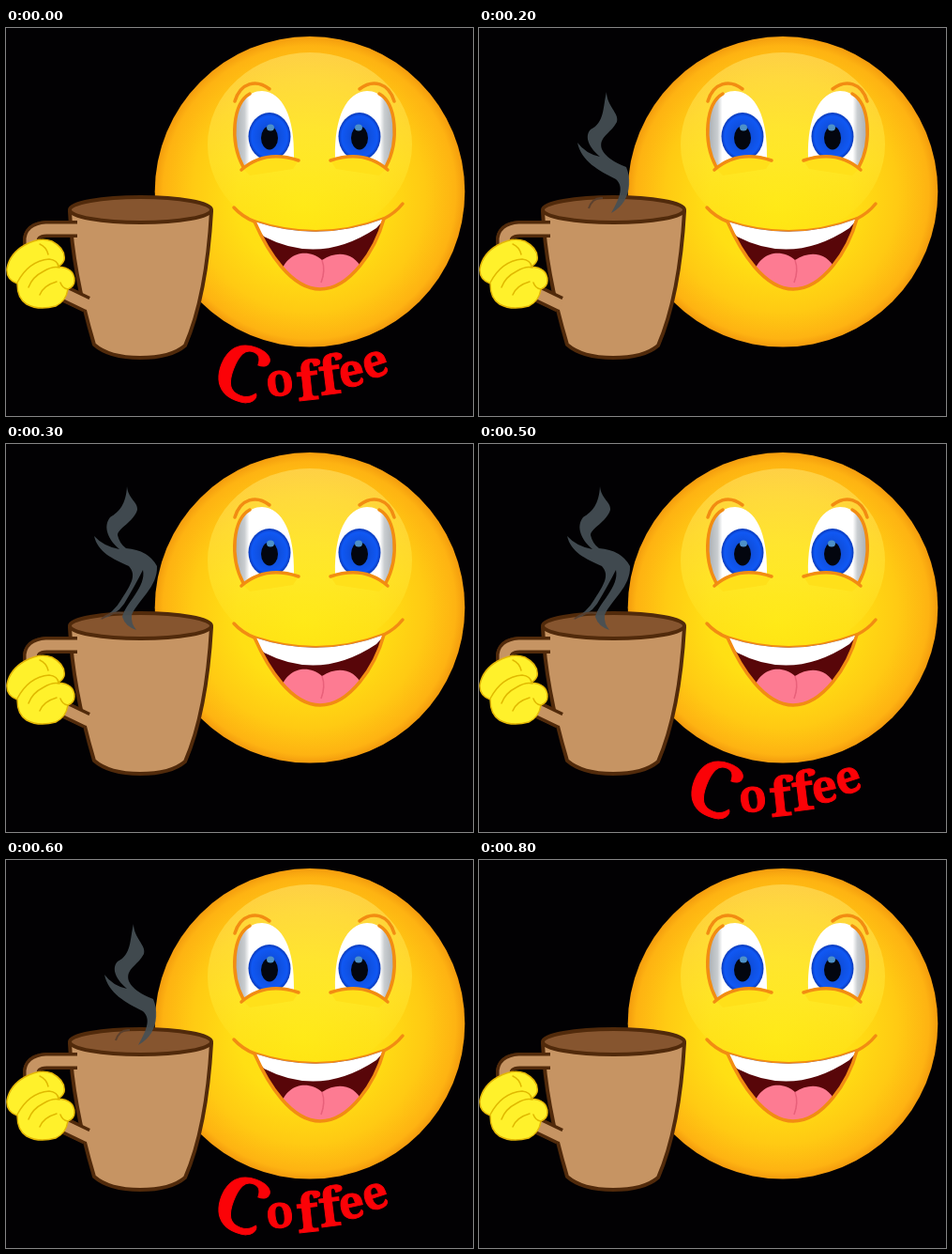
These frames come from a looping animation (498x413 px, 0.9 s). An HTML page:

```html
<!DOCTYPE html>
<html lang="en">
<head>
<meta charset="utf-8">
<title>Coffee</title>
<style>
  html, body { margin: 0; width: 100%; height: 100%; overflow: hidden; background: #020103; }
  svg { display: block; width: 100%; height: 100%; }
  .steam { fill: #465056; opacity: 0; }
  .word { fill: #fb0207; stroke: #fb0207; stroke-width: 1; font: 900 48px "Noto Serif", "DejaVu Serif", serif; opacity: 0; }
  .line { fill: none; stroke: #f28c12; stroke-width: 3.5; stroke-linecap: round; }
  .mug { stroke: #512a0b; stroke-width: 4; stroke-linejoin: round; }
  .fold { fill: none; stroke: #e0b900; stroke-width: 1.5; stroke-linecap: round; }
</style>
</head>
<body>
<svg viewBox="0 0 498 413" preserveAspectRatio="none">
  <defs>
    <radialGradient id="skin" gradientUnits="userSpaceOnUse" cx="324" cy="174" r="166" fx="318" fy="188">
      <stop offset="0" stop-color="#ffe812"/>
      <stop offset=".45" stop-color="#ffdf14"/>
      <stop offset=".75" stop-color="#ffca13"/>
      <stop offset=".94" stop-color="#feb312"/>
      <stop offset="1" stop-color="#f39a0d"/>
    </radialGradient>
    <linearGradient id="shine" x2="0" y2="1">
      <stop offset="0" stop-color="#ffe878" stop-opacity=".5"/>
      <stop offset=".6" stop-color="#fff040" stop-opacity=".4"/>
      <stop offset="1" stop-color="#fff030" stop-opacity="0"/>
    </linearGradient>
    <radialGradient id="iris">
      <stop offset="0" stop-color="#0a3fb4"/>
      <stop offset=".5" stop-color="#0f50e0"/>
      <stop offset=".85" stop-color="#1058f4"/>
      <stop offset="1" stop-color="#0838b8"/>
    </radialGradient>
    <linearGradient id="eye">
      <stop offset="0" stop-color="#a9aeb3"/>
      <stop offset=".16" stop-color="#c9cdd0"/>
      <stop offset=".24" stop-color="#fff"/>
    </linearGradient>
    <clipPath id="mouth"><path d="M265 206Q335 229 403 203C394 236 367 278 335 278C304 278 279 238 265 206Z"/></clipPath>
    <g id="eyeball">
      <path d="M253 148C237 117 243 67 273 67C295 68 308 95 307 138Q276 130 253 148Z" fill="url(#eye)"/>
      <path class="line" d="M253 148C238 120 242 80 260 70"/>
      <ellipse cx="281" cy="115.500" rx="22.500" ry="25.500" fill="url(#iris)"/>
      <ellipse cx="281" cy="117" rx="9" ry="12.500" fill="#03060f"/>
      <ellipse cx="282" cy="106" rx="4" ry="3.500" fill="#4e91c8"/>
      <path d="M253 150Q277 130 312 141L306 150L260 157Z" fill="#ffe01a"/>
      <path class="line" d="M251 151Q276 129 312 141"/>
      <path class="line" d="M244 78C250 58 267 54 281 65"/>
    </g>
  </defs>

  <rect width="498" height="413" fill="#020103"/>
  <circle cx="324" cy="174.300" r="165.300" fill="url(#skin)"/>
  <ellipse cx="324" cy="124" rx="109" ry="98" fill="url(#shine)"/>

  <use href="#eyeball"/>
  <use href="#eyeball" transform="matrix(-1 0 0 1 658 0)"/>

  <path class="line" d="M243 191Q252 201 265 206Q335 229 403 203Q415 197 423 187"/>
  <g clip-path="url(#mouth)">
    <rect x="250" y="190" width="170" height="95" fill="#580609"/>
    <path d="M292 264C298 238 322 234 337 247C354 236 372 240 380 257L340 284Z" fill="#fd7b92"/>
    <path d="M337 247Q341 258 336 271" fill="none" stroke="#e8607a" stroke-width="1.500"/>
    <path d="M260 203Q335 231 407 200L395 213Q335 253 275 222Z" fill="#fff"/>
  </g>
  <path class="line" d="M265 206C279 238 304 278 335 278C367 278 394 236 403 203"/>

  <path id="handle" d="M76 214H43Q26 215 27 228Q32 260 63 283L86 294" fill="none" stroke="#512a0b" stroke-width="18"/>
  <path class="mug" d="M68 195C70 240 80 290 94 337Q110 351 143 351Q176 351 191 338Q214 285 219 195Z" fill="#c69463"/>
  <use href="#handle" style="stroke: none"/>
  <path d="M76 214H43Q26 215 27 228Q32 260 63 283L88 295" fill="none" stroke="#c69463" stroke-width="11"/>
  <ellipse class="mug" cx="143.500" cy="193.500" rx="75.500" ry="13.500" fill="#86552f"/>

  <path d="M20 231Q36 222 49 227Q64 235 62 247Q60 252 55 254Q73 255 73 269Q73 275 66 278Q64 291 53 296Q35 301 22 294Q12 288 12 272Q0 268 1 256Q4 240 20 231Z" fill="#fff12b" stroke="#e4b606" stroke-width="1.500"/>
  <path class="fold" d="M36 230Q43 233 45 241M12 271Q24 248 46 246Q55 247 56 254M24 276Q28 265 40 259Q50 253 57 255M36 284Q40 274 54 270M66 278Q60 277 58 271"/>

  <g id="steam"></g>
  <g class="word" id="word">
    <text font-size="82" transform="translate(215 384) rotate(21)">C</text>
    <text transform="translate(279 393) rotate(-7)">o</text>
    <text font-size="56" transform="translate(312 397) rotate(-6)">f</text>
    <text font-size="56" transform="translate(336 391) rotate(-7)">f</text>
    <text transform="translate(358 384) rotate(-12)">e</text>
    <text transform="translate(385 375) rotate(-18)">e</text>
  </g>
</svg>
<script>
const STEP = 100, STEPS = 9;

const low = "M136 68C136 83 150 91 147 100C140 113 127 116 131 129Q136 140 157 148C162 160 161 174 155 184Q150 192 141 197C150 181 155 169 146 161C128 152 109 142 105 122Q114 134 129 137C115 125 113 114 119 108C134 101 132 84 136 68Z";
const middle = "M129 45C130 58 141 62 140 70C137 82 119 90 119 97Q121 106 128 111Q152 113 161 130C162 152 141 166 134 182Q133 191 139 198Q127 194 124 184C127 170 150 152 146 134Q138 150 126 170Q118 182 100 187Q116 178 122 167C133 150 140 140 131 130C113 122 98 115 94 98Q104 109 121 112C109 102 103 88 111 78C121 72 128 64 129 45Z";
const high = "M108 0H131C131 12 121 15 124 27Q132 36 149 42C166 61 139 77 125 98Q124 104 135 109Q151 114 162 124C169 145 141 151 137 173L131 169C134 151 149 141 139 129C124 116 104 117 85 108Q100 103 112 98C123 84 148 65 136 48C121 39 97 38 95 20Q107 30 120 32C109 18 105 10 108 0Z";

// The steam rises out of the cup and sinks back the same way.
const plumes = [
  { outline: low, wisp: "", steps: [1, 7], transform: "translate(50 68) scale(.65)" },
  { outline: low, wisp: "M117 192Q121 180 132 181", steps: [2, 6] },
  { outline: middle, wisp: "M102 186Q112 178 125 180", steps: [3, 5] },
  { outline: high, wisp: "M144 198Q135 187 145 181", steps: [4] }
];
const wordSteps = [0, 1, 5, 6];

function showDuring(node, steps, opacity = 1) {
  const frames = Array.from({ length: STEPS + 1 }, (_, i) => ({
    opacity: steps.includes(i % STEPS) ? opacity : 0,
    offset: i / STEPS,
    easing: "step-end"
  }));
  node.animate(frames, { duration: STEP * STEPS, iterations: Infinity }).startTime = 0;
}

function add(parent, tag, attributes) {
  const node = document.createElementNS("http://www.w3.org/2000/svg", tag);
  for (const [key, value] of Object.entries(attributes)) node.setAttribute(key, value);
  return parent.appendChild(node);
}

const steam = document.getElementById("steam");
for (const { outline, wisp, steps, transform = "" } of plumes) {
  const plume = add(steam, "g", { class: "steam", transform });
  add(plume, "path", { d: outline });
  add(plume, "path", { d: wisp, fill: "none", stroke: "#59402f", "stroke-width": 2 });
  showDuring(plume, steps, 0.92);
}
showDuring(document.getElementById("word"), wordSteps);
</script>
</body>
</html>
```
